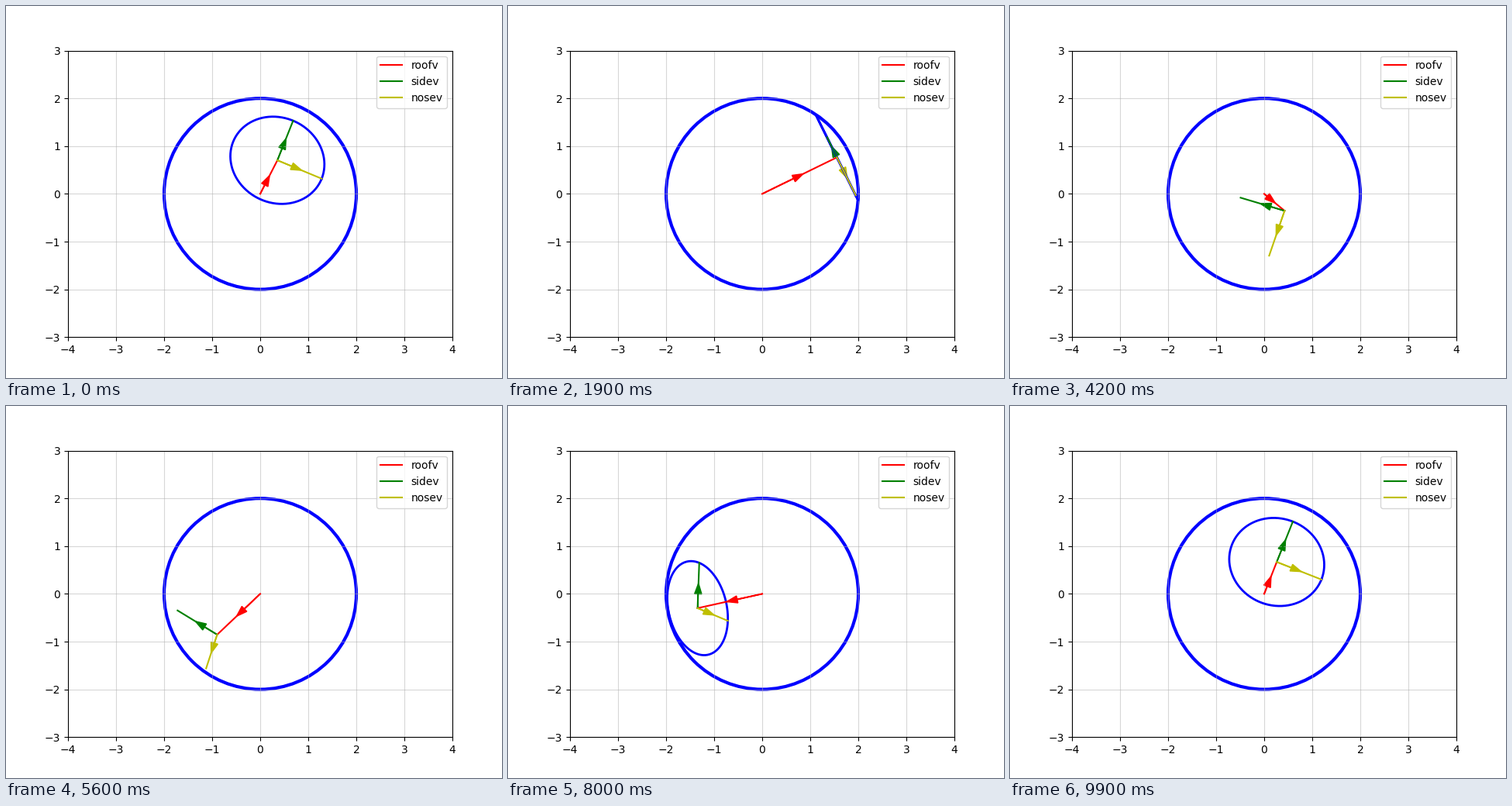
These frames come from a looping animation (640 px wide and 480 px high, 10000 ms). A matplotlib script:

```python
import numpy as np
import matplotlib.pyplot as plt
from matplotlib.animation import FuncAnimation
from matplotlib.patches import Circle, FancyArrow

FRAMES, INTERVAL = 100, 100
RADIUS = 2
HEIGHT = np.sqrt(RADIUS**2 - 1)  # distance from the centre to the unit circle's plane


def unit(v):
    return v / np.linalg.norm(v)


# Orthonormal start pose: up, direction of travel, rotation axis
UP = unit(np.array([0.2065, 0.4062, 0.8902]))
AHEAD = np.array([0.8842, 0.315, -0.345])
AHEAD = unit(AHEAD - AHEAD.dot(UP) * UP)
AXIS = np.cross(UP, AHEAD)
PHI = np.linspace(0, 2 * np.pi, 181)


def pose(i):
    """Roof, side and nose unit vectors after i steps around the sphere."""
    a = 2 * np.pi * i / FRAMES
    roof = UP * np.cos(a) + AHEAD * np.sin(a)
    ahead = AHEAD * np.cos(a) - UP * np.sin(a)
    return roof, (ahead + AXIS) / np.sqrt(2), (ahead - AXIS) / np.sqrt(2)


class Vector:
    """A line with an arrowhead near its middle."""

    def __init__(self, ax, color, label):
        self.line, = ax.plot([0, 1], [0, 1], color=color, label=label)
        self.head = FancyArrow(0, 0, 1, 1, width=0.001, head_width=0.15,
                               head_length=0.225, length_includes_head=True,
                               color=color)
        ax.add_patch(self.head)

    def set(self, start, v):
        x, y = start[:2]
        dx, dy = v[:2]
        self.line.set_data([x, x + dx], [y, y + dy])
        self.head.set_data(x=x, y=y, dx=0.55 * dx, dy=0.55 * dy)


fig, ax = plt.subplots(figsize=(6.4, 4.8), dpi=100)
ax.set_xlim(-4, 4)
ax.set_ylim(-3, 3)
ax.grid(alpha=0.5)
ax.add_patch(Circle((0, 0), RADIUS, fill=False, ec="b", lw=3))
ring, = ax.plot([], [], "b", lw=2)
roofv = Vector(ax, "r", "roofv")
sidev = Vector(ax, "g", "sidev")
nosev = Vector(ax, "y", "nosev")
ax.legend(loc="upper right")


def update(i):
    roof, side, nose = pose(i)
    top = HEIGHT * roof
    pts = top + np.outer(np.cos(PHI), nose) + np.outer(np.sin(PHI), side)
    ring.set_data(pts[:, 0], pts[:, 1])
    ring.set_visible(bool(roof[2] > 0))  # hidden on the far side
    roofv.set(np.zeros(3), top)
    sidev.set(top, side)
    nosev.set(top, nose)
    return []


anim = FuncAnimation(fig, update, frames=FRAMES, interval=INTERVAL,
                     repeat=True, repeat_delay=0)
plt.show()
```
